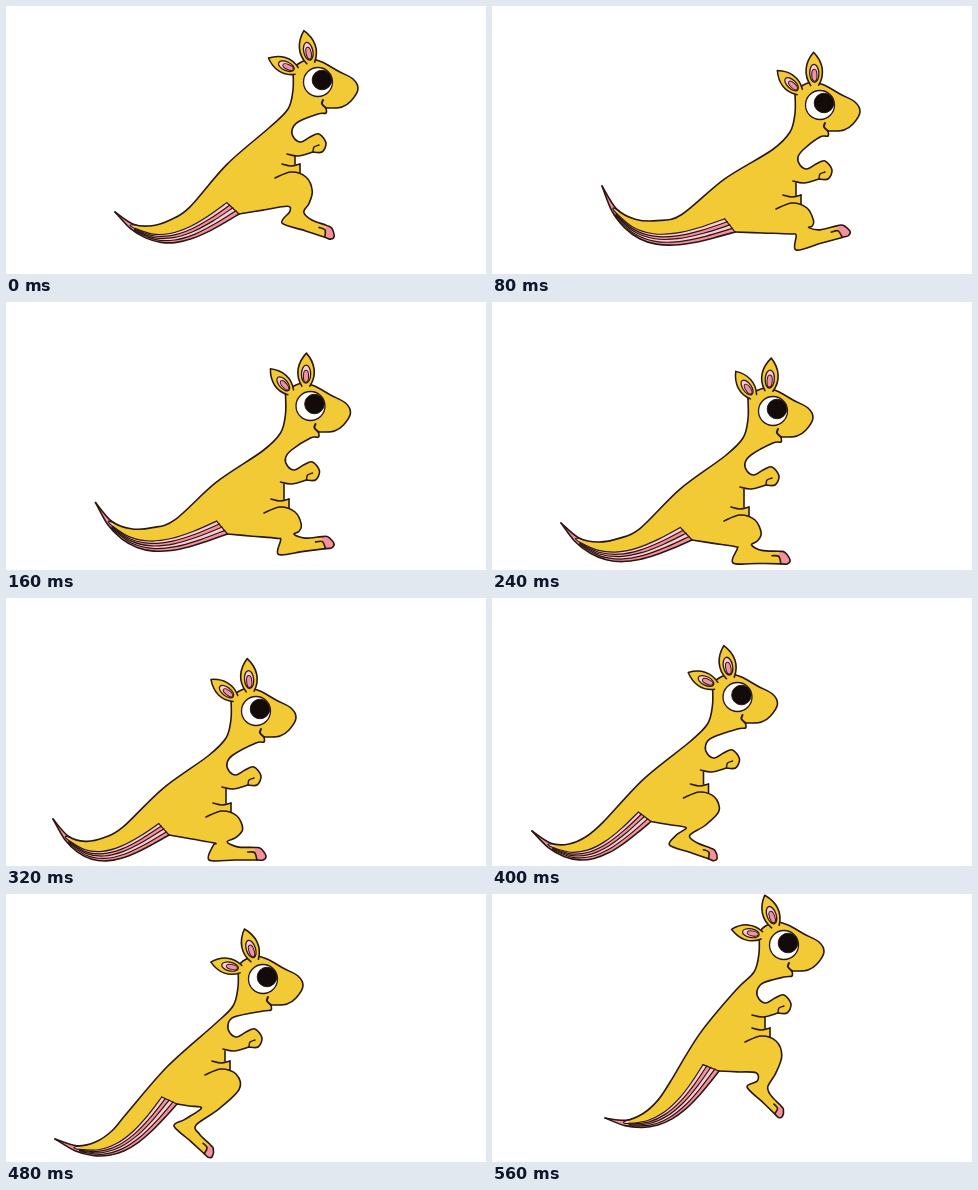
An HTML page with a canvas for the animation above (640 ms loop, 480 px wide and 268 px high).

```html
<!DOCTYPE html>
<html lang="en">
<head>
<meta charset="utf-8">
<title>Hopping kangaroo</title>
<style>
  html, body { margin: 0; width: 100%; height: 100%; overflow: hidden; background: #fff; }
  canvas { display: block; width: 100%; height: 100%; }
</style>
</head>
<body>
<canvas id="stage" width="480" height="268"></canvas>
<script>
const ctx = document.getElementById('stage').getContext('2d');
const INK = '#2b1712', GOLD = '#f2ca35', PINK = '#f2929f', PALE = '#fbcdd3';
const STEP = 80;

// Joints of the rig; bend is the sag of the tail in pixels, sway the tilt of the ears in degrees.
const leap = { eye: [312, 76], paw: [312, 138], pouch: [294, 158], hip: [233, 208], tip: [109, 206], heel: [276, 217], toe: [327, 234], bend: 30, sway: -16 };
const reach = { eye: [328, 99], paw: [332, 165], pouch: [309, 189], hip: [243, 226], tip: [110, 180], heel: [304, 244], toe: [359, 229], bend: 38, sway: -6 };
const stand = { eye: [281, 109], paw: [279, 175], pouch: [257, 205], hip: [200, 238], tip: [69, 221], heel: [241, 261], toe: [298, 262], bend: 31, sway: 0 };
const crouch = { eye: [250, 113], paw: [247, 179], pouch: [225, 205], hip: [163, 237], tip: [47, 221], heel: [203, 262], toe: [260, 262], bend: 35, sway: -9 };
const push = { eye: [257, 85], paw: [248, 145], pouch: [224, 167], hip: [171, 210], tip: [49, 245], heel: [168, 232], toe: [204, 265], bend: 31, sway: -22 };
const rise = { eye: [292, 51], paw: [291, 111], pouch: [278, 134], hip: [227, 177], tip: [113, 224], heel: [255, 193], toe: [288, 225], bend: 27, sway: -23 };

const mix = (a, b, t) => a + (b - a) * t;
const blend = (p, q, t) => [mix(p[0], q[0], t), mix(p[1], q[1], t)];
const add = (p, x, y) => [p[0] + x, p[1] + y];
const around = (p, ...offsets) => offsets.map(o => add(p, ...o));
const range = (n, from, to) => Array.from({ length: n + 1 }, (_, i) => mix(from, to, i / n));

function turn([x, y], degrees) {
  const a = degrees * Math.PI / 180;
  return [x * Math.cos(a) - y * Math.sin(a), x * Math.sin(a) + y * Math.cos(a)];
}

function between(a, b, dx) {
  const pose = {};
  for (const key in a) {
    pose[key] = Array.isArray(a[key]) ? add(blend(a[key], b[key], 0.5), dx, 0) : mix(a[key], b[key], 0.5);
  }
  return pose;
}

const poses = [leap, reach, between(reach, stand, 0), stand, crouch, between(crouch, push, -8), push, rise];

// Maps (along, side) to the stage; along runs from 0 at p to 1 at q, side is in pixels.
function frame(p, q) {
  const dx = q[0] - p[0], dy = q[1] - p[1], len = Math.hypot(dx, dy);
  return (along, side) => add(p, dx * along - dy / len * side, dy * along + dx / len * side);
}

// Smooth curve through the points, continuing the current path.
function curve(pts) {
  ctx.lineTo(...pts[0]);
  for (let i = 0; i < pts.length - 1; i++) {
    const p = pts[i], q = pts[i + 1];
    const a = pts[i - 1] || p, b = pts[i + 2] || q;
    ctx.bezierCurveTo(
      p[0] + (q[0] - a[0]) / 6, p[1] + (q[1] - a[1]) / 6,
      q[0] - (b[0] - p[0]) / 6, q[1] - (b[1] - p[1]) / 6, q[0], q[1]);
  }
}

function fill(color, ...parts) {
  ctx.beginPath();
  parts.forEach(curve);
  ctx.closePath();
  ctx.fillStyle = color;
  ctx.fill();
}

function stroke(width, ...parts) {
  ctx.lineWidth = width;
  for (const part of parts) {
    ctx.beginPath();
    curve(part);
    ctx.stroke();
  }
}

function oval(x, y, rx, ry, color, line) {
  ctx.beginPath();
  ctx.ellipse(x, y, rx, ry, 0, 0, Math.PI * 2);
  ctx.fillStyle = color;
  ctx.fill();
  ctx.lineWidth = line;
  ctx.stroke();
}

function ear([x, y], degrees, size) {
  ctx.save();
  ctx.translate(x, y);
  ctx.rotate(degrees * Math.PI / 180);
  ctx.scale(size, size);
  ctx.beginPath();
  ctx.moveTo(-4, 1);
  ctx.bezierCurveTo(-11, -10, -9, -22, 0, -32);
  ctx.bezierCurveTo(9, -22, 11, -10, 4, 1);
  ctx.fillStyle = GOLD;
  ctx.fill();
  ctx.lineWidth = 1.6;
  ctx.stroke();
  oval(0, -11, 4.6, 9, PALE, 1.3);
  oval(0, -9, 2.6, 6, PINK, 1);
  ctx.restore();
}

function tailShape({ tip, hip, bend }) {
  const at = frame(tip, hip);
  const inset = (t, w) => at(t, bend * Math.sin(Math.PI * t ** 0.82) - w);
  const skin = t => 58 * t ** 1.15;
  const edge = k => [
    inset(0.17, skin(0.17)), inset(0.125, 3.5),
    ...range(5, 0.16, mix(0.9, 1, k)).map(t => inset(t, 21 * t * (1 - k)))
  ];
  return {
    top: range(4, 0, 0.6).map(t => inset(t, skin(t))),
    rim: range(8, 0, 1).map(t => inset(t, 0)),
    edges: [0, 0.25, 0.5, 0.75].map(edge)
  };
}

function drawTail({ top, rim, edges }) {
  const seam = edges[0];
  fill(PINK, [...seam].reverse(), [seam[0], top[1], top[0]], rim);
  const bands = edges.map((e, i) => i ? e.slice(2) : e);
  for (const i of [0, 2]) fill(PALE, bands[i], [...bands[i + 1]].reverse());
  stroke(1.2, ...bands, [seam[seam.length - 1], rim[rim.length - 1]]);
}

function legShape({ pouch, heel, toe, hip }) {
  const at = frame(heel, toe), size = Math.hypot(toe[0] - heel[0], toe[1] - heel[1]);
  const foot = (x, y) => at(x, -y * size);
  const shin = foot(0.32, 0.32), ankle = foot(0.07, 0.25);
  const knee = blend(add(pouch, 13, 25), shin, 0.08);
  const pit = blend(add(pouch, -15, 38), ankle, 0.45);
  const nail = [foot(0.8, 0.22), foot(0.91, 0.2), foot(1, 0.07), foot(0.95, 0), foot(0.84, 0)];
  const outline = [
    ...around(pouch, [-25, 14], [-9, 8], [6, 13]), knee, add(blend(knee, shin, 0.5), 1, 2),
    shin, foot(0.5, 0.23), ...nail, foot(0.45, 0), foot(0, 0), ankle, pit, blend(pit, hip, 0.5), hip
  ];
  return { outline, nail, crease: [foot(0.68, 0.14), foot(0.8, 0.13), foot(0.84, 0)] };
}

function draw(pose) {
  const { eye, paw, pouch, hip, sway } = pose;
  const tail = tailShape(pose), leg = legShape(pose);

  const nape = around(eye, [-25, -12], [-25, 8], [-30, 27], [-48, 45]);
  const rump = tail.top[tail.top.length - 1];
  const back = [...nape, frame(nape[3], rump)(0.5, 4), ...[...tail.top].reverse()];
  const face = around(eye, [-25, -12], [-20, -18], [-8, -23], [4, -20], [20, -11], [35, -3], [40, 7], [33, 19], [24, 25], [13, 26], [8, 26]);
  const throat = [...around(eye, [8, 26], [8, 31], [0, 32]),
    ...around(paw, [-20, -22], [-26, -14], [-24, -6], [-17, -2], [-8, -7], [1, -10], [8, -1], [4, 8], [-5, 8])];
  const arm = around(paw, [-5, 8], [-20, 12], [-31, 10]);
  const waist = add(pouch, -5, 0);
  const belly = [[waist[0], paw[1] + 12], waist];
  const hem = around(pouch, [0, 0], [0, 9]);
  const flap = around(pouch, [-18, 0], [-9, 2], [0, 0]);

  ctx.fillStyle = '#fff';
  ctx.fillRect(0, 0, 480, 268);
  ctx.strokeStyle = INK;
  ctx.lineCap = ctx.lineJoin = 'round';

  fill(GOLD, face, throat, arm.slice(0, 2), belly, hem, [add(pouch, -9, 8), hip], [...tail.rim].reverse(), [...back].reverse());
  fill(GOLD, leg.outline);
  drawTail(tail);
  fill(PINK, leg.nail, [leg.crease[1]]);
  stroke(1.6, leg.outline, leg.crease, back, tail.rim, face, throat, arm, belly, hem, flap);
  stroke(1.4, around(paw, [1, 1], [-4, 3], [-5, 8]));
  stroke(2, around(eye, [5, 18], [4, 22], [8, 26]));

  ear(add(eye, ...turn([-4, -21], sway * 0.6)), sway + 4, 1);
  ear(add(eye, ...turn([-20, -15], sway * 0.6)), sway * 1.9 - 35, 0.94);

  oval(...eye, 14.5, 14.5, '#fff', 1.3);
  oval(eye[0] + 4, eye[1] - 2, 9.8, 9.8, '#120b0a', 1);
}

const start = performance.now();
function tick() {
  const elapsed = performance.now() - start;
  draw(poses[Math.floor(elapsed / STEP) % poses.length]);
  requestAnimationFrame(tick);
}
tick();
</script>
</body>
</html>
```
